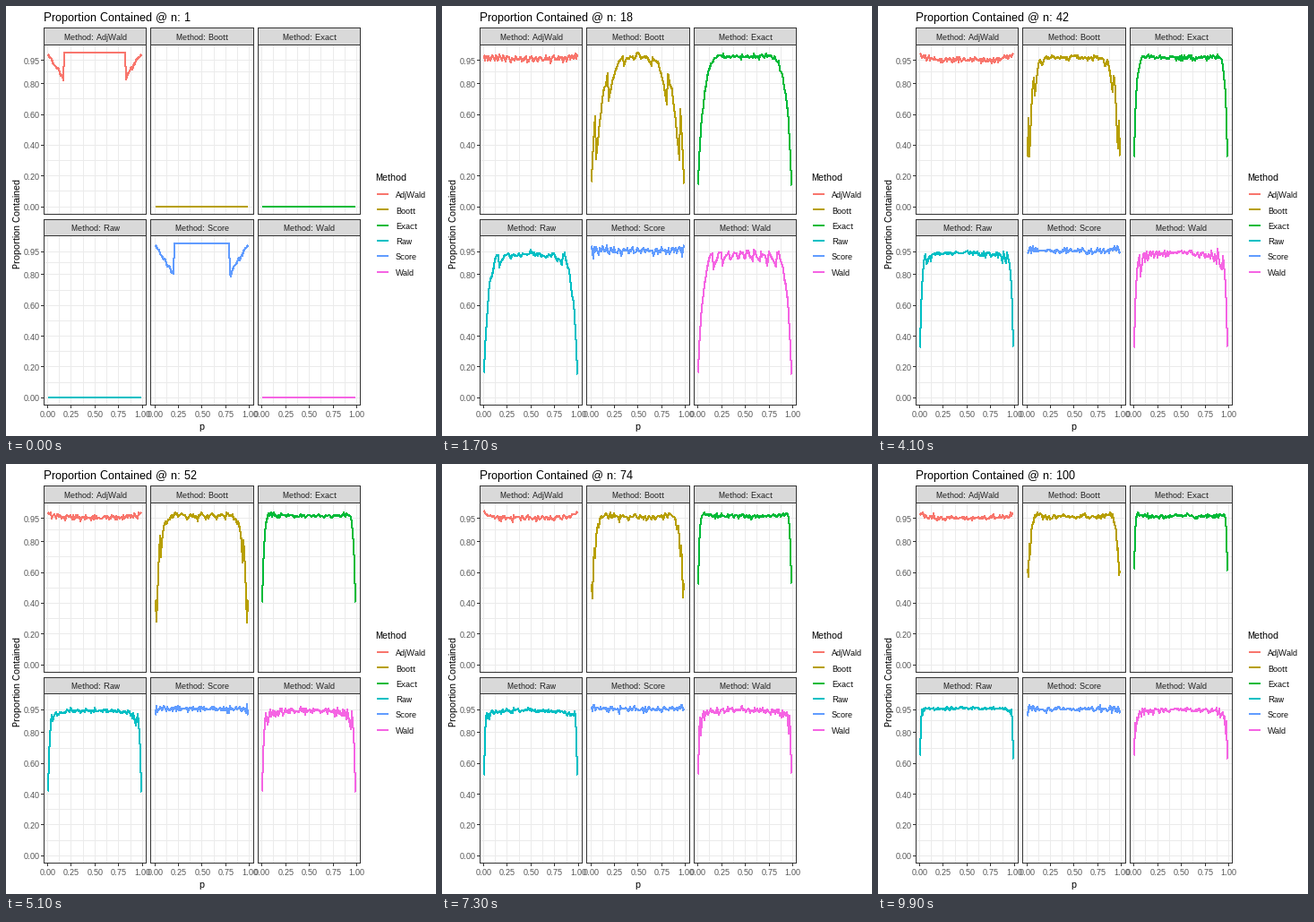
A matplotlib script that plays this animation: 480 by 480 pixels, repeating every 10000 ms.

```python
import numpy as np
import matplotlib.pyplot as plt
from matplotlib.animation import FuncAnimation
from matplotlib.patches import Rectangle

plt.rcParams.update({
    "font.family": "Liberation Sans", "path.simplify": False,
    "text.hinting": "native", "text.hinting_factor": 1,
})

SIZE, DPI = 480, 72
N_MAX, REPS, BOOT = 100, 1000, 200
Z, ALPHA, EPS = 1.96, 0.025, 1e-9
COLORS = {
    "AdjWald": "#F8766D", "Boott": "#B79F00", "Exact": "#00BA38",
    "Raw": "#00BFC4", "Score": "#619CFF", "Wald": "#F564E3",
}
P = np.arange(1, 100) / 100
LOG_FACT = np.concatenate([[0], np.cumsum(np.log(np.arange(1, N_MAX + 1)))])
rng = np.random.default_rng(7)


# ---- coverage simulation ----

def binom_pmf(n, p):
    """Rows are successes 0..n, columns follow p."""
    k = np.arange(n + 1)[:, None]
    p = np.clip(p, 1e-15, 1 - 1e-15)[None, :]
    choose = LOG_FACT[n] - LOG_FACT[k] - LOG_FACT[n - k]
    pmf = np.exp(choose + k * np.log(p) + (n - k) * np.log(1 - p))
    return pmf / pmf.sum(axis=0)


def adj_wald(n, x, pmf):
    mid = (x + 2) / (n + 4)
    return np.abs(P - mid) <= Z * np.sqrt(mid * (1 - mid) / (n + 4))


def wald(n, x, pmf):
    mid = x / n
    return np.abs(P - mid) < Z * np.sqrt(mid * (1 - mid) / n)


def score(n, x, pmf):
    return np.abs(P - x / n) <= Z * np.sqrt(P * (1 - P) / n)


def exact(n, x, pmf):
    below = np.cumsum(pmf, axis=0)
    above = 1 - below + pmf
    inner = (x > 0) & (x < n)
    return (below >= ALPHA) & (above >= ALPHA) & inner


def percentile(n, x, pmf):
    """Chance that a percentile bootstrap interval holds each p."""
    boot = binom_pmf(n, x[:, 0] / n).T
    below = np.cumsum(boot, axis=1)
    above = np.cumsum(boot[:, ::-1], axis=1)[:, ::-1]

    def chance(q):
        q = np.clip(q, 0, 1)
        z = (q - ALPHA) / (np.sqrt(q * (1 - q) / BOOT) + 1e-6)
        return 1 / (1 + np.exp(-np.clip(1.7 * z, -50, 50)))

    up = np.ceil(n * P - EPS).astype(int)
    down = np.floor(n * P + EPS).astype(int)
    return chance(above[:, up]) * chance(below[:, down])


def boot_t(n, x, pmf):
    """Bootstrap-t interval, dropping resamples without spread."""
    inside = np.zeros(pmf.shape)
    if n < 2:
        return inside
    k = np.arange(1, n)
    sd = np.sqrt(k * (n - k))
    boot = binom_pmf(n, k / n)[1:n]
    for i in k:
        t = (k - i) / sd
        cum = np.cumsum(boot[:, i - 1]) / boot[:, i - 1].sum()
        t_lo = t[np.argmax(cum >= ALPHA)]
        t_hi = t[np.argmax(cum >= 1 - ALPHA)]
        low, high = i - t_hi * sd[i - 1], i - t_lo * sd[i - 1]
        inside[i] = (n * P >= low - EPS) & (n * P <= high + EPS)
    return inside


METHODS = {
    "AdjWald": adj_wald, "Boott": boot_t, "Exact": exact,
    "Raw": percentile, "Score": score, "Wald": wald,
}


def coverage(n):
    x = np.arange(n + 1)[:, None]
    pmf = binom_pmf(n, P)
    share = rng.multinomial(REPS, pmf.T).T / REPS
    return {m: (share * f(n, x, pmf)).sum(axis=0) for m, f in METHODS.items()}


COVER = [coverage(n) for n in range(1, N_MAX + 1)]


# ---- drawing, in pixels from the top left ----

fig = plt.figure(figsize=(SIZE / DPI, SIZE / DPI), dpi=DPI, facecolor="white")
ax = fig.add_axes([0, 0, 1, 1])
ax.set_xlim(0, SIZE)
ax.set_ylim(SIZE, 0)
ax.axis("off")

LEFT, TOP, WIDTH = 42.4, 43.3, 114.2
HEIGHT, STRIP = 188.9, 18.5
PITCH_X, PITCH_Y = 119.58, 213.21
Y_BREAKS = [0, 0.2, 0.4, 0.6, 0.8, 0.95]
X_BREAKS = [0, 0.25, 0.5, 0.75, 1]


def to_x(p, col):
    return LEFT + col * PITCH_X + 4.1 + 105.8 * np.asarray(p)


def to_y(v, row):
    return 224.15 + row * PITCH_Y - 171.9 * np.asarray(v)


def pix(v):
    return np.floor(v) + 0.5


def line(x, y, color, z=1):
    """Hard-edged: one pixel wide on pixel centres, two on pixel edges."""
    return ax.plot(x, y, color=color, lw=1, zorder=z, antialiased=False,
                   snap=False, solid_capstyle="butt",
                   solid_joinstyle="round")[0]


def box(x0, y0, x1, y1, fill, z):
    x0, y0, x1, y1 = (pix(v) for v in (x0, y0, x1, y1))
    ax.add_patch(Rectangle((x0, y0), x1 - x0, y1 - y0, facecolor=fill,
                           edgecolor="#333333", lw=1, zorder=z,
                           antialiased=False, snap=False))


def label(x, y, text, size, color="black", ha="center"):
    return ax.text(x, y + 0.36 * size, text, fontsize=size, color=color,
                   ha=ha, va="baseline", zorder=6)


def panel(name, col, row):
    x0, y0 = LEFT + col * PITCH_X, TOP + row * PITCH_Y
    x1, y1 = x0 + WIDTH, y0 + HEIGHT
    mids = [(a + b) / 2 for a, b in zip(Y_BREAKS, Y_BREAKS[1:])]
    for v in Y_BREAKS + mids:
        y = pix(to_y(v, row))
        line([x0, x1], [y, y], "#EBEBEB")
    for v in np.arange(9) / 8:
        x = pix(to_x(v, col))
        line([x, x], [y0, y1], "#EBEBEB")
    box(x0, y0, x1, y1, "none", 4)
    box(x0, y0 - STRIP, x1, y0, "#D9D9D9", 5)
    label((x0 + x1) / 2 + 0.3, y0 - STRIP / 2 + 0.9, "Method: " + name, 9,
          "#1A1A1A")

    if col == 0:
        for v in Y_BREAKS:
            y = to_y(v, row)
            line([39, 42], [pix(y), pix(y)], "#333333")
            label(37.3, y + 0.8, f"{v:.2f}", 9, "#4D4D4D", "right")
    if row == 1:
        for v in X_BREAKS:
            x = to_x(v, col)
            line([pix(x), pix(x)], [446, 449], "#333333")
            label(x + 0.2, 456, f"{v:.2f}", 9, "#4D4D4D")
    return line([], [], COLORS[name], 3)


curves = {}
for i, name in enumerate(COLORS):
    row, col = divmod(i, 3)
    curves[name] = (panel(name, col, row), col, row)
    y = 210.6 + 17.28 * i
    line([414, 427], [np.floor(y)] * 2, COLORS[name])
    label(435, y + 0.4, name, 9, ha="left")

label(412, 191, "Method", 11, ha="left")
label(218, 469.3, "p", 11)
ax.text(18, 242.8, "Proportion Contained", fontsize=11, rotation=90,
        ha="right", va="center")
title = label(42, 12.4, "", 13, ha="left")


def update(i):
    title.set_text(f"Proportion Contained @ n: {i + 1}")
    for name, (curve, col, row) in curves.items():
        curve.set_data(np.floor(to_x(P, col)),
                       np.floor(to_y(COVER[i][name], row)))
    return [title] + [c[0] for c in curves.values()]


anim = FuncAnimation(fig, update, frames=N_MAX, interval=100, repeat=True,
                     repeat_delay=0, blit=False)
plt.show()
```
